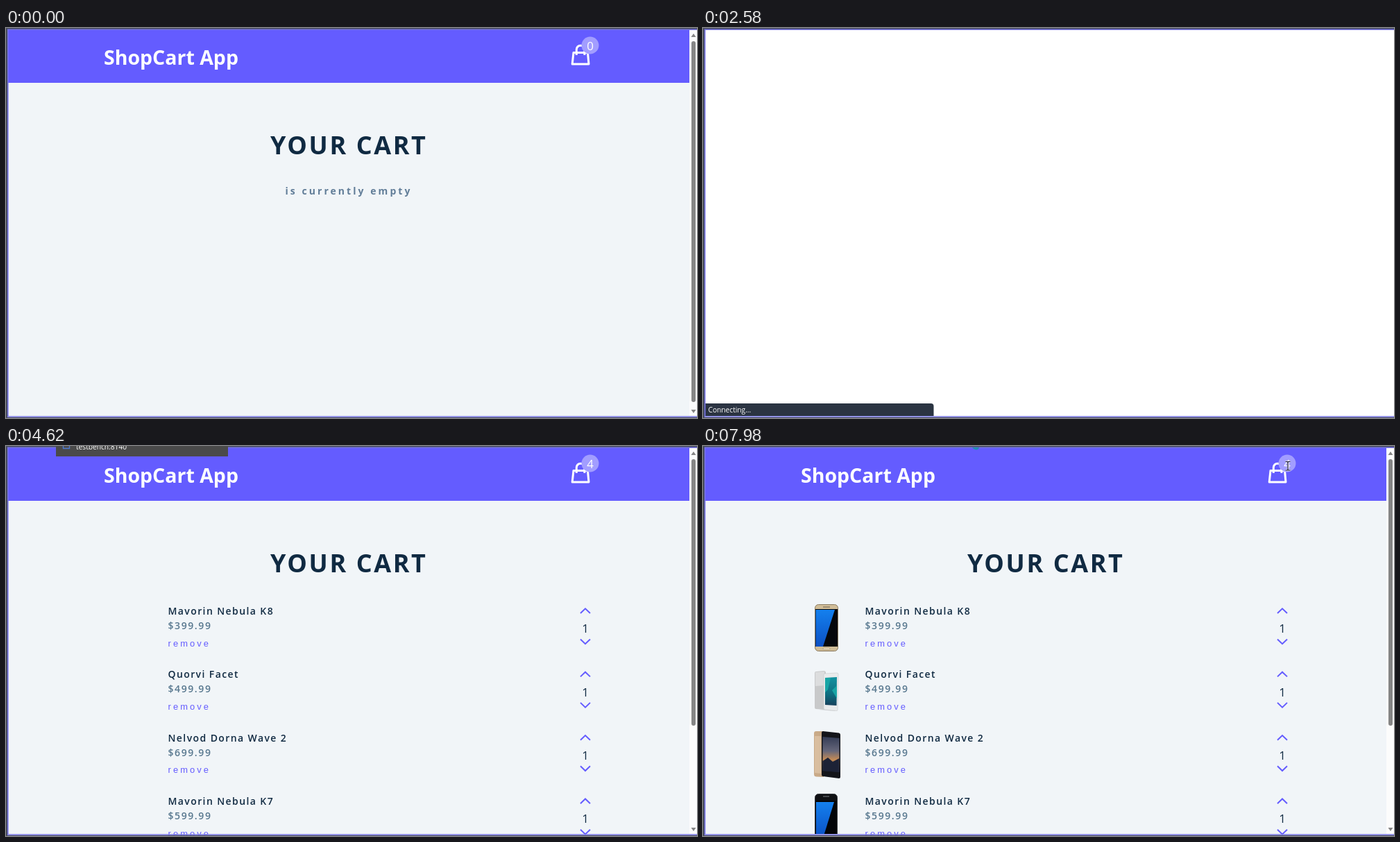
An HTML page that plays this animation: 996x562 px, repeating every 8 s.

```html
<!DOCTYPE html>
<html lang="en">
<head>
<meta charset="utf-8">
<title>Shopping cart</title>
<style>
  html, body { margin: 0; width: 100%; height: 100%; overflow: hidden; background: #f1f5f8; }
  #stage { position: relative; width: 996px; height: 562px; overflow: hidden; }
  #stage > svg { position: absolute; left: 0; top: 0; }
  text { font-family: "Open Sans", "Noto Sans", sans-serif; white-space: pre; }
  .logo { font-size: 28.5px; font-weight: 700; fill: #fff; }
  .title { font-size: 36px; font-weight: 700; letter-spacing: 2.6px; fill: #102a42; }
  .empty { font-size: 14px; font-weight: 700; letter-spacing: 3.05px; fill: #617d98; }
  .loading { font-size: 56px; font-weight: 700; letter-spacing: 2.8px; fill: #102a42; }
  .name, .price { font-size: 14px; font-weight: 600; letter-spacing: 1.4px; fill: #102a42; }
  .price { letter-spacing: 1.6px; fill: #58788f; }
  .remove { font-family: "Liberation Sans", Arial, sans-serif; font-size: 12.9px; letter-spacing: 3.1px; fill: #645cff; }
  .count { font-size: 17px; text-anchor: middle; fill: #102a42; }
  .badge { font-size: 17px; text-anchor: middle; fill: #fff; }
  .small { font-size: 10.2px; fill: #fff; }
  .chevron { fill: none; stroke: #645cff; stroke-width: 2; }
  .phone { position: absolute; overflow: hidden; width: 40px; height: 0; }
  .phone svg { display: block; }
</style>
</head>
<body>
<div id="stage">
  <svg width="996" height="562">
    <rect width="996" height="562" fill="#f1f5f8"/>
    <g id="shop">
      <rect x="3" y="3" width="982" height="76" fill="#645cff"/>
      <text class="logo" x="141" y="53">ShopCart App</text>
      <g fill="none" stroke="#fff" stroke-width="3" stroke-linejoin="round">
        <path d="M818 35.5H838.5L840 52H816.2Z"/>
        <path d="M822.3 39V31a5.8 5.8 0 0 1 11.6 0V39"/>
      </g>
      <circle cx="842" cy="25" r="12.5" fill="#a29dff"/>
      <text class="title" x="381" y="181.5">YOUR CART</text>
      <rect x="985" y="3" width="11" height="556" fill="#fcfcfc"/>
      <path d="M987.5 13L991 8L994.5 13ZM987.5 550L991 555L994.5 550Z" fill="#858585"/>
    </g>
    <g id="emptyCart">
      <text class="badge" x="842" y="31.5">0</text>
      <text class="empty" x="402.5" y="239.5">is currently empty</text>
      <rect x="988" y="19" width="6" height="520" rx="3" fill="#858585"/>
    </g>
    <g id="fullCart">
      <text class="badge" x="842" y="31.5">4</text>
      <rect x="988" y="19" width="6" height="384" rx="3" fill="#858585"/>
      <g id="rows"></g>
    </g>
    <rect id="blank" x="3" y="3" width="993" height="556" fill="#fff"/>
    <text id="loading" class="loading" x="351" y="126">Loading...</text>
  </svg>

  <div class="phone" id="phone1" style="left:160px;top:228px">
    <svg width="40" height="70">
      <rect x="1.5" y=".5" width="33" height="67" rx="5" fill="#d0bd98" stroke="#8a7a60"/>
      <path d="M13 4H23" stroke="#7d705a" stroke-width="1.2"/>
      <rect x="2" y="7" width="32" height="54" fill="#05070c"/>
      <path d="M2.5 8H30L13 61H2.5Z" fill="url(#blue)"/>
      <rect x="13" y="63" width="10" height="2.4" rx="1.2" fill="#eee0c4" stroke="#8a7a60" stroke-width=".5"/>
    </svg>
  </div>
  <div class="phone" id="phone2" style="left:160px;top:324px">
    <svg width="40" height="70">
      <path d="M7 56L30 58L34 55L30 53Z" fill="#d3d6d9"/>
      <path d="M1 3Q1 1 3 1L14 0Q17 0 17 3V56L3 55Q1 55 1 53Z" fill="#c8c9ca"/>
      <path d="M2 2L15 1V21L2 22Z" fill="#dcddde"/>
      <path d="M14 6Q14 4 16 4L33 3Q35 3 35 5L34 56Q34 58 32 57.5L16 56Q14 56 14 54Z" fill="#e9ebec" stroke="#c7cacc" stroke-width=".6"/>
      <path d="M16 10L33 9L32.5 50L16 49Z" fill="url(#teal)"/>
      <path d="M16 10H24L20 27L16 31ZM26 28L33 21V40Z" fill="#18a5a5"/>
    </svg>
  </div>
  <div class="phone" id="phone3" style="left:160px;top:411px">
    <svg width="40" height="70">
      <path d="M0 3Q0 0 3 0H14V66L3 65.5Q0 65 0 62Z" fill="#c9aa88"/>
      <path d="M1 7H10V61L1 60Z" fill="#d9bea0"/>
      <path d="M11 2Q11 0 13 0L36 2.5Q38 3 38 5V66Q38 68 36 68L13 65Q11 65 11 63Z" fill="#14151a"/>
      <path d="M12.5 8L36.5 10V59L12.5 57Z" fill="url(#dusk)"/>
      <path d="M12.5 43L20 38L27 44L36.5 39V59L12.5 57Z" fill="#1d2236"/>
    </svg>
  </div>
  <div class="phone" id="phone4" style="left:160px;top:501px">
    <svg width="40" height="70">
      <rect x="1.5" y=".5" width="32" height="67" rx="5" fill="#101114" stroke="#33363b"/>
      <path d="M13 4H22" stroke="#6b6e73" stroke-width="1.2"/>
      <rect x="2.5" y="10" width="30" height="54" fill="#030407"/>
      <path d="M3 12H29L13 64H3Z" fill="url(#blue)"/>
    </svg>
  </div>

  <svg width="996" height="562">
    <defs>
      <linearGradient id="blue" x2="0" y2="1">
        <stop stop-color="#1480ee"/><stop offset="1" stop-color="#0b50c4"/>
      </linearGradient>
      <linearGradient id="teal" x2="0" y2="1">
        <stop stop-color="#1292a0"/><stop offset=".6" stop-color="#0d6f80"/><stop offset="1" stop-color="#17415c"/>
      </linearGradient>
      <linearGradient id="dusk" x2="0" y2="1">
        <stop stop-color="#343c55"/><stop offset=".4" stop-color="#65667a"/>
        <stop offset=".65" stop-color="#c58b55"/><stop offset="1" stop-color="#1d2236"/>
      </linearGradient>
    </defs>
    <g id="status">
      <path d="M3 541H328.5Q332.5 541 332.5 545V559H3Z" fill="#2b3442"/>
      <text class="small" x="7.5" y="554">Connecting...</text>
    </g>
    <path d="M0 0H996V2H2V561H996V562H0Z" fill="#464b5e"/>
    <path d="M996 2.3H2.8V560H996" fill="none" stroke="#7673e4" stroke-width="1.6"/>
    <g id="tip">
      <rect x="69" width="60" height="17" fill="#4a4a4a"/>
      <text class="small" x="82" y="10">Reload</text>
    </g>
    <g id="card">
      <path d="M72 0H320V15H72Z" fill="#4a4a4a"/>
      <path d="M82.5 0V3.5H91.5V0" fill="none" stroke="#4f7bd0" stroke-width="1.4"/>
      <text class="small" x="101" y="4.5">testbench:8140</text>
    </g>
    <path id="speck" d="M388 2H398Q397 6 393 5.5Q390 5 388 2Z" fill="#1f8fb0"/>
    <path id="arrow" d="M.5 .5V13.6L3.5 10.9L5.7 16.3L8 15.3L5.8 10.2H10Z" fill="#fff" stroke="#111"/>
    <g id="beam" fill="none">
      <path d="M839.5 22.5H842L843 23.5L844 22.5H846.5M843 23.5V34M839.5 35H842L843 34L844 35H846.5" stroke="#d8d6f5" stroke-width="2.4"/>
      <path d="M839.5 22.5H842L843 23.5L844 22.5H846.5M843 23.5V34M839.5 35H842L843 34L844 35H846.5" stroke="#26263a" stroke-width="1.2"/>
    </g>
  </svg>
</div>
<script>
const LOOP = 8000;
const $ = id => document.getElementById(id);

const items = [
  ["Mavorin Nebula K8", "$399.99"],
  ["Quorvi Facet", "$499.99"],
  ["Nelvod Dorna Wave 2", "$699.99"],
  ["Mavorin Nebula K7", "$599.99"]
];
$("rows").innerHTML = items.map(([name, price], i) => `
  <g transform="translate(0 ${i * 91.4})">
    <text class="name" x="233.5" y="243">${name}</text>
    <text class="price" x="233.5" y="264">${price}</text>
    <text class="remove" x="233.5" y="288.5">remove</text>
    <path class="chevron" d="M828 241L835 234.3L842 241M828 278.5L835 285.2L842 278.5"/>
    <text class="count" x="835" y="269.3">1</text>
  </g>`).join("");

// Holds each value until the next time in the table.
function steps(id, prop, table) {
  const last = table[table.length - 1][1];
  const frames = [...table, [LOOP, last]].map(([t, value]) =>
    ({ offset: t / LOOP, [prop]: value, easing: "step-end" }));
  $(id).animate(frames, { duration: LOOP, iterations: Infinity });
}

// Shows an element only during the given [from, to] spans.
function show(id, ...spans) {
  const table = spans[0][0] > 0 ? [[0, 0]] : [];
  for (const [from, to] of spans) {
    table.push([from, 1]);
    if (to < LOOP) table.push([to, 0]);
  }
  steps(id, "opacity", table);
}

show("shop", [0, 830], [4620, LOOP]);
show("emptyCart", [0, 830]);
show("fullCart", [4620, LOOP]);
show("status", [500, 4280]);
show("blank", [830, 4280]);
show("loading", [4280, 4620]);
show("tip", [1530, 2580]);
show("card", [3950, 5650]);
show("speck", [5650, LOOP]);
show("arrow", [6300, 7980]);
show("beam", [7980, LOOP]);

steps("phone1", "height", [[0, "0px"], [6300, "28px"], [6980, "70px"]]);
steps("phone2", "height", [[0, "0px"], [5300, "3px"], [5970, "70px"]]);
steps("phone3", "height", [[0, "0px"], [5970, "70px"]]);
steps("phone4", "height", [[0, "0px"], [5300, "2px"], [5970, "58px"]]);

const path = [[0, 491, 91], [6650, 493, 100], [6980, 703, 198], [7320, 801, 97], [7650, 839, 44]];
steps("arrow", "transform", path.map(([t, x, y]) => [t, `translate(${x}px, ${y}px)`]));
</script>
</body>
</html>
```
